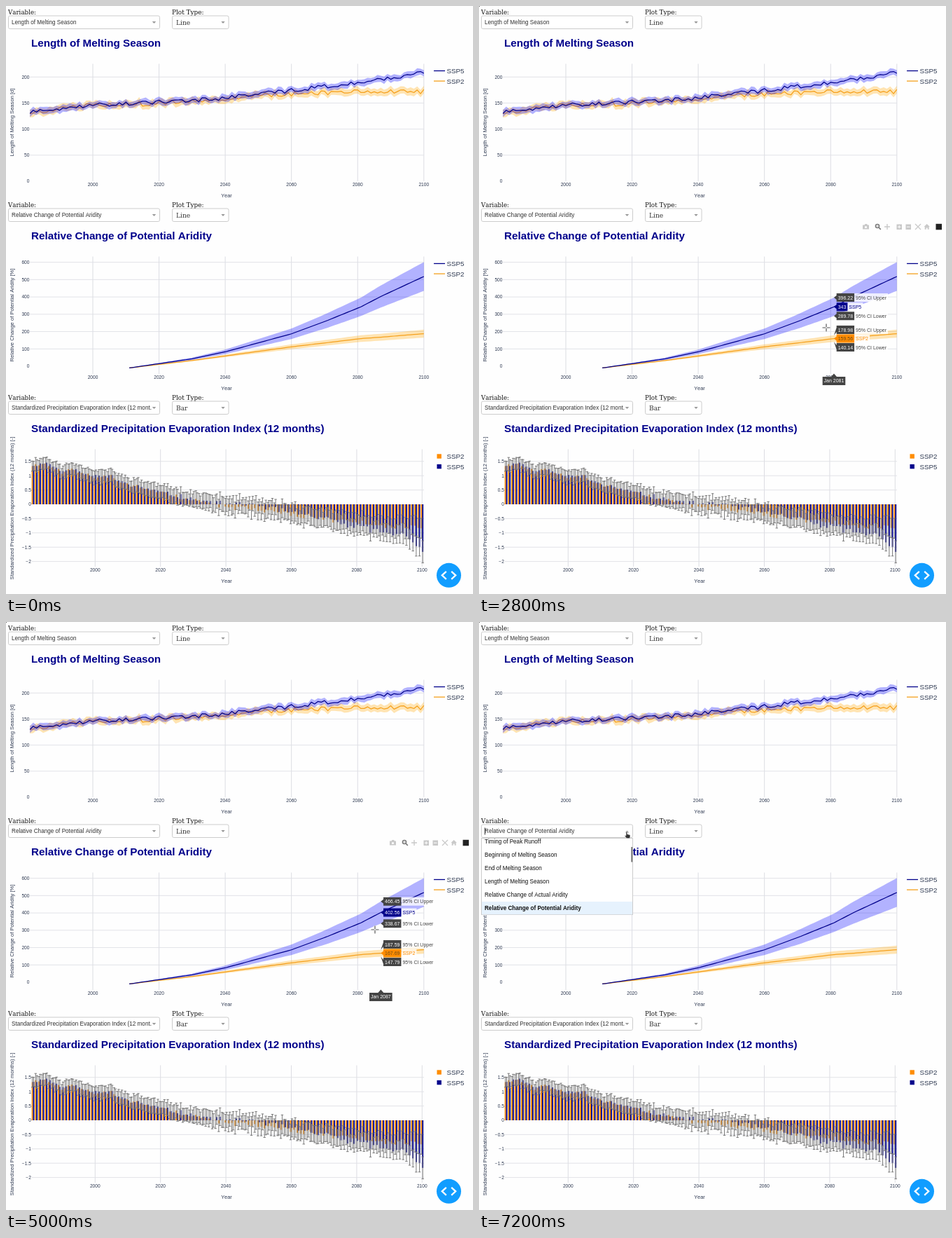
An HTML page that plays this animation: 667 by 839 pixels, repeating every 8000 ms.

```html
<!DOCTYPE html>
<html lang="en">
<head>
<meta charset="utf-8">
<title>Climate dashboard</title>
<style>
  html, body { margin: 0; width: 100%; height: 100%; overflow: hidden; background: #fefefe; }
  svg { display: block; width: 100%; height: 100%; font-family: "Liberation Sans", Arial, sans-serif; font-kerning: none; }
  .serif { font-family: "DejaVu Serif", serif; }
</style>
</head>
<body>
<svg id="stage" viewBox="0 0 667 839" preserveAspectRatio="none">
  <g id="page"></g>
  <g id="live"></g>
</svg>
<script>
const NAVY = '#00008b', ORANGE = '#ff8c00', AMBER = '#f5a01c', INK = '#2f3a52', DARK = '#444';
const LOOP = 8000, STEP = 200, ROW = 275;

// ---------- drawing helpers ----------
const n2 = v => Math.round(v * 100) / 100;
const text = (x, y, s, size, fill = INK, more = '') =>
  `<text x="${n2(x)}" y="${n2(y + size * .355)}" font-size="${size}" fill="${fill}" ${more}>${s}</text>`;
const rect = (x, y, w, h, fill, more = '') =>
  `<rect x="${n2(x)}" y="${n2(y)}" width="${n2(w)}" height="${n2(h)}" fill="${fill}" ${more}/>`;
const path = (d, fill, stroke = 'none', width = 1, more = '') =>
  `<path d="${d}" fill="${fill}" stroke="${stroke}" stroke-width="${width}" ${more}/>`;
const poly = pts => 'M' + pts.map(p => n2(p[0]) + ' ' + n2(p[1])).join('L');
const MID = 'text-anchor="middle"', END = 'text-anchor="end"', BOLD = 'font-weight="bold"';

function random(seed) {
  return () => {
    seed = (seed * 1664525 + 1013904223) % 4294967296;
    return seed / 4294967296;
  };
}

// Linear interpolation in rows of [key, a, b, ...], returning column col.
function lerp(rows, key, col = 1) {
  const i = Math.max(1, rows.findIndex(r => r[0] >= key));
  const a = rows[i - 1], b = rows[i];
  return a[col] + (b[col] - a[col]) * (key - a[0]) / (b[0] - a[0]);
}

const years = (from, to = 2100) => Array.from({ length: to - from + 1 }, (_, i) => from + i);
const lineX = year => 124 + (year - 2000) * 4.728;
const barX = year => 127.3 + (year - 2000) * 4.67;

// ---------- page furniture ----------
const arrow = (x, y, up) => path(up ? `M${x - 2.7} ${y + 1.5}h5.4l-2.7-3z` : `M${x - 2.7} ${y - 1.5}h5.4l-2.7 3z`, '#999');

function select(x, y, w, label) {
  return rect(x + .5, y + .5, w - 1, 18.5, '#fff', 'rx="2.2" stroke="#ccc"') + label + arrow(x + w - 8.5, y + 10);
}

function controls(top, variable, kind) {
  return text(3, top + 8.5, 'Variable:', 8.7, '#111', 'class="serif"') +
    text(237, top + 8.5, 'Plot Type:', 8.9, '#111', 'class="serif"') +
    select(3, top + 13.5, 217, text(8, top + 23.2, variable, 8.17, '#333')) +
    select(237, top + 13.5, 81.5, text(243, top + 23.8, kind, 9.1, '#333', 'class="serif"'));
}

function axes({ top, title, unit, labelY, x, y, left, ticks }) {
  let s = text(36, top + 53, title, 15.22, NAVY, BOLD);
  for (let year = 2000; year <= 2100; year += 20) {
    s += path(`M${n2(x(year))} ${top + 82.5}v167.5`, 'none', '#d9dae0', .9) +
      text(x(year), top + 255, year, 6.6, INK, MID);
  }
  for (const v of ticks) {
    if (v) s += path(`M${left} ${n2(y(v))}H597`, 'none', '#dfe0e6', .9);
    s += text(left - .6, y(v), String(v).replace('-', '−'), 6.6, INK, END);
  }
  return s + text(315, top + 270, 'Year', 7.4, INK, MID) +
    `<g transform="translate(8 ${labelY}) rotate(-90)">${text(0, 0, `${title} [${unit}]`, 7.62, INK, MID)}</g>`;
}

function legend(top, items, square) {
  return items.map(([name, color], i) => {
    const y = top + 92.5 + i * 14.6;
    return (square ? rect(615.5, y - 3.2, 6.4, 6.4, color) : path(`M611 ${y}h16`, 'none', color, 1.3)) +
      text(629.5, y, name, 9.8);
  }).join('');
}

// Points are [x, y, half height of the band].
function bandLine(pts, fill, stroke) {
  const hi = pts.map(([x, y, h]) => [x, y - h]);
  const lo = pts.map(([x, y, h]) => [x, y + h]).reverse();
  return path(poly(hi.concat(lo)) + 'Z', fill, 'none', 0, 'fill-opacity=".3"') +
    path(poly(pts), 'none', stroke, 1.25, 'stroke-linejoin="round"');
}

// ---------- melting season: trend in days plus yearly noise ----------
const SPLIT = 2014;
const melt5 = [[1981, 132], [2000, 146], [2030, 155], [2040, 159], [2050, 168], [2060, 174], [2080, 190], [2100, 208]];
const melt2 = [[SPLIT, 147], [2040, 158], [2050, 165], [2080, 172], [2100, 172]];
const meltY = v => 250 - v * .7435;

function meltChart() {
  const series = (trend, band, rnd) => years(1981).map(year => {
    const rows = year > SPLIT ? trend : melt5;
    return [lineX(year), meltY(lerp(rows, year) + (rnd() - .5) * 8), band + rnd() * 1.6];
  });
  return axes({ top: 0, title: 'Length of Melting Season', unit: 'd', labelY: 166, x: lineX, y: meltY,
      left: 34, ticks: [0, 50, 100, 150, 200] }) +
    bandLine(series(melt2, 4.4, random(5)), 'orange', AMBER) +
    bandLine(series(melt5, 3.8, random(6)), 'blue', NAVY) +
    legend(0, [['SSP5', NAVY], ['SSP2', AMBER]]);
}

// ---------- aridity: [year, mean, half width of the interval] ----------
const arid5 = [[2011, -10, 0], [2030, 43, 7], [2040, 83, 13], [2060, 187, 30], [2071, 264.93, 42.155],
  [2072, 273.16, 43.58], [2081, 343, 53.22], [2087, 402.56, 63.89], [2100, 518, 83]];
const arid2 = [[2011, -10, 0], [2030, 33, 4], [2060, 112, 14], [2071, 136.54, 16.51],
  [2072, 138.89, 16.53], [2081, 159.56, 19.42], [2087, 167.69, 19.9], [2100, 188, 23]];
const aridY = v => 514 - v * .2472;

function aridChart() {
  const series = rows => years(2011).map(y => [lineX(y), aridY(lerp(rows, y)), lerp(rows, y, 2) * .2472]);
  return axes({ top: ROW, title: 'Relative Change of Potential Aridity', unit: '%', labelY: 441, x: lineX, y: aridY,
      left: 34, ticks: [0, 100, 200, 300, 400, 500, 600] }) +
    bandLine(series(arid2), 'orange', AMBER) + bandLine(series(arid5), 'blue', NAVY) +
    legend(ROW, [['SSP5', NAVY], ['SSP2', AMBER]]);
}

// ---------- precipitation index ----------
const index5 = [[1981, 1.36], [1985, 1.44], [1990, 1.12], [1993, 1.24], [2000, .97], [2005, .97], [2008, .76],
  [2020, .42], [2036, .06], [2045, 0], [2060, -.25], [2080, -.8], [2094, -1.12], [2100, -1.62]];
const index2 = [[SPLIT, .6], [2030, .14], [2041, -.1], [2060, -.35], [2080, -.65], [2100, -.82]];
const indexY = v => 711 - v * 40.8;

function indexChart() {
  const rnd = random(11);
  let bars = '', errors = '';
  const bar = (year, x, rows, color) => {
    const age = (year - 1981) / 119;
    const v = lerp(rows, year) + (rnd() - .5) * (.1 + age * .12);
    const half = .15 + age * .14 + rnd() * .1, mid = n2(x + .93);
    const hi = n2(indexY(v + half)), lo = n2(indexY(v - half));
    bars += rect(x, indexY(Math.max(v, 0)), 1.87, Math.abs(v) * 40.8, color);
    errors += `M${mid} ${hi}V${lo}M${n2(mid - 1.7)} ${hi}h3.4M${n2(mid - 1.7)} ${lo}h3.4`;
  };
  for (const year of years(1981)) {
    bar(year, barX(year) - 1.87, year > SPLIT ? index2 : index5, ORANGE);
    bar(year, barX(year), index5, NAVY);
  }
  return axes({ top: 2 * ROW, title: 'Standardized Precipitation Evaporation Index (12 months)', unit: '-',
      labelY: 716.5, x: barX, y: indexY, left: 36.5, ticks: [1.5, 1, .5, 0, -.5, -1, -1.5, -2] }) +
    bars + path(errors, 'none', '#747474', .95) +
    legend(2 * ROW, [['SSP2', ORANGE], ['SSP5', NAVY]], true);
}

const codeButton = '<circle cx="632.5" cy="812.3" r="17.5" fill="#119dff"/>' +
  path('M628.8 806.8l-6 5.5 6 5.5M636.2 806.8l6 5.5-6 5.5', 'none', '#fff', 2.3);

document.getElementById('page').innerHTML =
  controls(0, 'Length of Melting Season', 'Line') + meltChart() +
  controls(ROW, 'Relative Change of Potential Aridity', 'Line') + aridChart() +
  controls(2 * ROW, 'Standardized Precipitation Evaporation Index (12 mont.', 'Bar') + indexChart() + codeButton;

// ---------- chart toolbar ----------
const toolbar = (() => {
  const g = '#c9c9c9', y = 315;
  const zoomBox = (x, sign) => rect(x, y - 3.5, 7.5, 7.5, g) + path(sign, 'none', '#fff', 1);
  return path(`M548 ${y - 2.5}h2.5l1-1.5h2.5l1 1.5h2v6h-9z`, g) + `<circle cx="552.5" cy="${y + .5}" r="1.6" fill="#fff"/>` +
    `<circle cx="569" cy="${y - 1}" r="2.6" fill="#ddd" stroke="#777" stroke-width="1.4"/>` +
    path(`M571 ${y + 1}l2.8 2.8`, 'none', '#777', 1.7) +
    path(`M579 ${y}h8M583 ${y - 4}v8`, 'none', g, 1.4) +
    zoomBox(596.5, `M598 ${y + .2}h4.5M600.2 ${y - 2}v4.5`) +
    zoomBox(609.5, `M611 ${y + .2}h4.5`) +
    path(`M623 ${y - 4}l8 8M631 ${y - 4}l-8 8`, 'none', g, 1.2) +
    path(`M635.5 ${y}l4.2-4 4.2 4h-1.2v3.8h-2v-2.4h-2v2.4h-2V${y}z`, g) +
    rect(652.5, y - 4.2, 8.5, 8.5, '#222');
})();

// ---------- hover labels ----------
const GAP = 12.5;

// Pushes sorted labels apart, keeping each cluster centred on its points.
function spreadOut(ys) {
  const groups = [];
  ys.forEach((y, i) => {
    let g = { sum: y - i * GAP, n: 1 };
    while (groups.length && groups.at(-1).sum / groups.at(-1).n > g.sum / g.n) {
      const p = groups.pop();
      g = { sum: p.sum + g.sum, n: p.n + g.n };
    }
    groups.push(g);
  });
  return groups.flatMap(g => Array(g.n).fill(g.sum / g.n)).map((y, i) => y + i * GAP);
}

function hover(year) {
  const x = lineX(year);
  const trio = (rows, name, color) => {
    const v = lerp(rows, year), half = lerp(rows, year, 2);
    return [[v + half, '95% CI Upper', DARK], [v, name, color], [v - half, '95% CI Lower', DARK]];
  };
  const rows = [...trio(arid5, 'SSP5', NAVY), ...trio(arid2, 'SSP2', ORANGE)];
  const ys = spreadOut(rows.map(r => aridY(r[0])));
  const labels = rows.map(([v, name, color], i) => {
    const y = ys[i], value = String(+v.toFixed(2)), left = x + 3.7;
    const w = (value.replace('.', '').length * .556 + (value.includes('.') ? .278 : 0)) * 7 + 4;
    return rect(left + w, y - 6, name.length > 4 ? 48 : 22, 12, '#fff', 'fill-opacity=".8"') +
      path(`M${n2(x)} ${n2(aridY(v))}L${n2(left)} ${n2(y - 3)}V${n2(y - 6)}h${n2(w)}v12h${n2(-w)}v-3z`, color) +
      text(left + 2, y, value, 7, color === ORANGE ? '#6b4a1a' : '#fff') +
      text(left + w + 2, y, name, 7, color);
  }).join('');
  return labels + path(`M${n2(x)} 524.5l4 4.5h12.3v12h-32.6v-12h12.3z`, DARK) + text(x, 535, 'Jan ' + year, 7, '#fff', MID);
}

// ---------- pointer: [time, x, y] ----------
const track = [[1200, 640, 560], [1600, 596, 423], [2800, 496, 459], [3400, 435, 475], [3800, 468, 470],
  [4600, 560, 431], [5000, 527, 439], [5400, 444, 400], [5800, 327, 372], [6200, 295, 356]];
const HOVER_LAG = 105;

function pointer(x, y) {
  const inPlot = x < 598 && y > 357 && y < 525;
  if (!inPlot) return path(`M${n2(x)} ${n2(y)}v10l2.3-2.2 1.6 3.6 1.5-.7-1.6-3.5h3.2z`, '#222', '#fff', .6);
  const cross = `M${n2(x - 5.5)} ${n2(y)}h11M${n2(x)} ${n2(y - 5.5)}v11`;
  return path(cross, 'none', '#fff', 3) + path(cross, 'none', '#555', 1.2) + rect(x - 1, y - 1, 2, 2, '#ddd');
}

const hand = path('M210 299.5q1-1 1.8 0v3.2l3.2.8q1.3.5 1 2l-.6 3.2h-4.6l-2.6-3.4q0-1.2 1.8-.4z', '#333', '#fff', .5);

// ---------- open menu ----------
const menu = (() => {
  const options = ['Timing of Peak Runoff', 'Beginning of Melting Season', 'End of Melting Season',
    'Length of Melting Season', 'Relative Change of Actual Aridity', 'Relative Change of Potential Aridity'];
  return rect(3.5, 308.5, 216, 109, '#fff', 'stroke="#ccc"') +
    rect(4, 399, 215, 18.3, '#e6f2fd') +
    options.map((s, i) => text(8, 313 + i * 19, s, 8.15, '#111', i === 5 ? BOLD : '')).join('') +
    rect(217.3, 321, 2, 21.5, '#777') +
    rect(205, 294, 12, 10, '#fff') + arrow(211.5, 299, true) +
    path('M8.5 293.5v10', 'none', '#222', .9);
})();

function scene(t) {
  let s = t >= 600 ? rect(0, 0, 1, 1, '#555') : '';
  if (t >= 1200 && t < 6200) {
    s += toolbar;
    if (t >= 1800) s += hover(Math.round(2000 + (lerp(track, t - HOVER_LAG) - 124) / 4.728));
    s += pointer(lerp(track, t), lerp(track, t, 2));
  }
  if (t >= 6800) s += menu;
  if (t >= 6600) s += hand;
  return s;
}

const live = document.getElementById('live');
const start = performance.now();
let shown = -1;
function tick() {
  const t = Math.floor(((performance.now() - start) % LOOP) / STEP) * STEP;
  if (t !== shown) live.innerHTML = scene(shown = t);
  requestAnimationFrame(tick);
}
tick();
</script>
</body>
</html>
```
